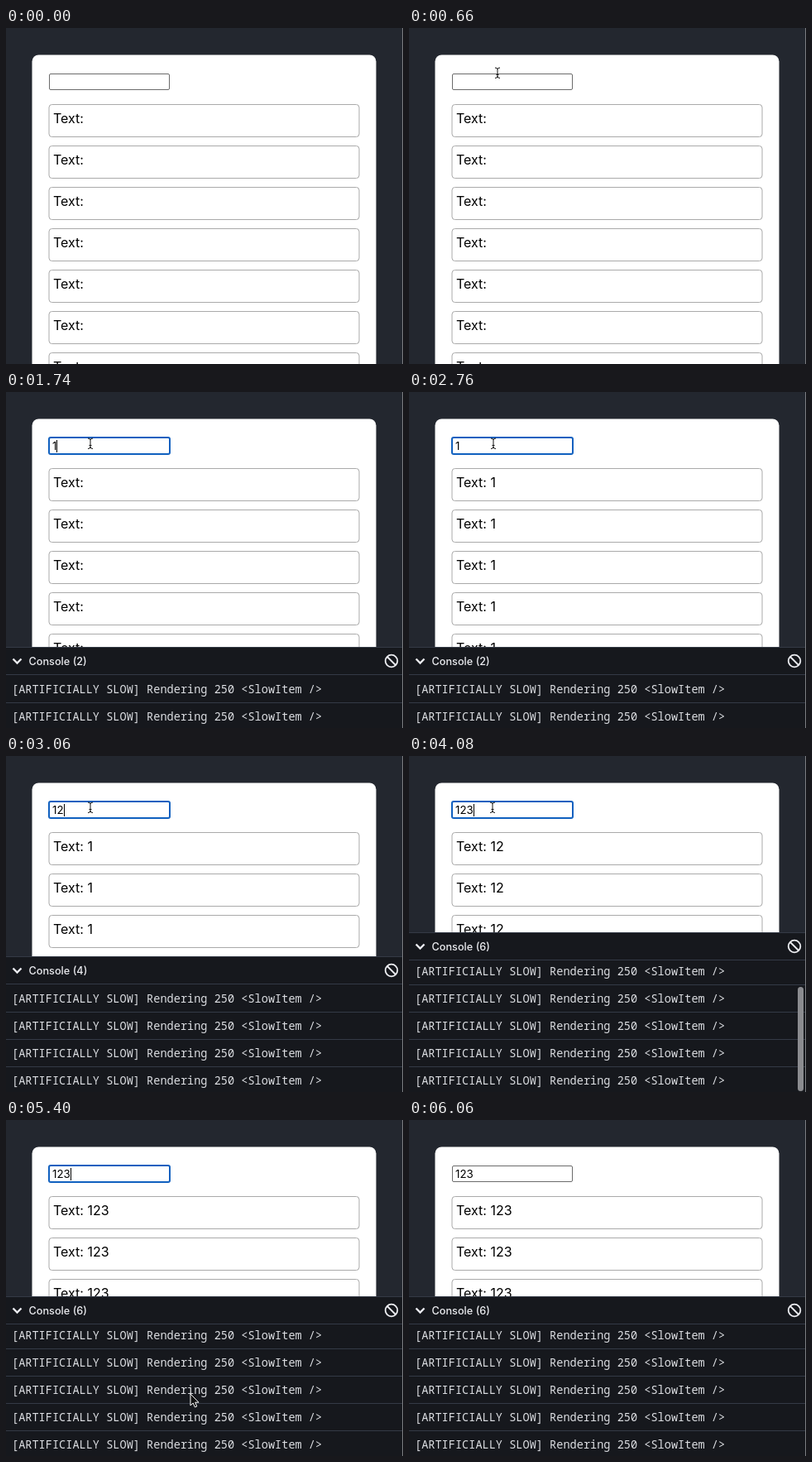
Write an HTML page that moves like this. It is 480x406 px and loops after 7080 ms.

```html
<!DOCTYPE html>
<html lang="en">
<head>
<meta charset="utf-8">
<style>
  * { box-sizing: border-box; }
  html, body { margin: 0; width: 100%; height: 100%; overflow: hidden; }
  body { position: relative; background: #23272f; }
  #stage, #stage div, svg { position: absolute; }
  #stage { width: 480px; height: 406px; overflow: hidden; }
  #card {
    left: 31px; top: 32px; width: 415.5px; height: 400px; border-radius: 8px;
    background: #fff; transform: translate(.5px, .5px);
  }
  #edge { right: 0; width: 1px; height: 100%; background: #7b7d81; }
  #field {
    left: 52px; top: 55px; width: 146px; height: 20px; padding-left: 3px;
    border: 1px solid #6b6b6b; border-radius: 2px; background: #fff;
    font: 13.33px/18px Inter, sans-serif; color: #000; white-space: pre;
  }
  #field.focus { box-shadow: 0 0 0 1px #1060bf; border-color: #1060bf; }
  #caret { position: absolute; top: 2px; width: 1px; height: 15px; background: #000; }
  #list { transform: translateX(-.5px); }
  .item {
    left: 52px; width: 376px; height: 40px; padding: 4px 4.5px;
    border: 1px solid #aaa; border-radius: 4px;
    font: 16px/24px Inter, sans-serif; color: #000; white-space: pre;
  }
  #console { left: 0; bottom: -2px; width: 479px; overflow: hidden; background: #16181d; color: #ebecf0; }
  #head {
    top: 0; width: 100%; height: 34px; padding-left: 27.5px; background: #16181d;
    border: solid #343a46; border-width: 1px 0;
    font: 500 12.7px/33px Inter, sans-serif;
  }
  #head svg { left: 0; top: -1px; }
  #rows { bottom: 0; width: 100%; }
  #rows p {
    margin: 0; height: 33px; padding-left: 7px;
    font: 13.6px/33px "Noto Sans Mono", monospace; white-space: pre; color: #dcdee2;
  }
  #rows p + p { border-top: 1px solid #343a46; line-height: 31px; }
  #thumb { left: 470px; top: 279px; width: 7px; height: 126px; border-radius: 4px; background: #8b8c90; }
  #pointer { left: 0; top: 0; overflow: visible; }
</style>
</head>
<body>
<div id="stage">
  <div id="card"></div>
  <div id="field"><span id="typed"></span><span id="caret"></span></div>
  <div id="list"></div>
  <div id="console">
    <div id="rows"></div>
    <div id="head"><span id="count"></span>
      <svg width="479" height="34" fill="none" stroke="#ebecf0">
        <path d="M8.5 14.5l5 5 5-5" stroke-width="2.4"/>
        <circle cx="466" cy="17" r="7.3" stroke-width="1.8"/>
        <path d="M461 12l10 10" stroke-width="1.8"/>
      </svg>
    </div>
  </div>
  <div id="thumb"></div>
  <div id="edge"></div>
  <svg id="pointer" width="1" height="1">
    <path id="beam" d="M-3-6Q0-6 0-4Q0-6 3-6M0-4V5M-3 6.5Q0 6.5 0 4.5Q0 6.5 3 6.5M-1.5 2.5H1.5" fill="none" stroke="#111"/>
    <path id="arrow" d="M0 0V14L3.2 11 5.4 16 7.8 15 5.7 10.2H10Z" fill="#111" stroke="#fff"/>
  </svg>
</div>
<script>
  const LOOP = 7080, TICK = 60;
  const $ = id => document.getElementById(id);

  const KEYS = [1740, 2940, 4020];        // a digit is typed
  const UPDATES = [2100, 3360, 4440];     // the list catches up
  const FOCUS = 1020, BLUR = 6060;
  const BLINKS = [FOCUS, 1740, 3000, 4080], BLINK = 535;
  const PATH = [[60, 260, 410], [660, 107, 54], [1020, 102, 62], [3720, 102, 62], [3960, 101, 62],
    [4140, 101, 62], [4260, 102, 62], [4920, 102, 62], [5640, 265, 425]];

  const passed = (times, t) => times.filter(at => t >= at).length;
  const show = (el, on) => { el.style.visibility = on ? "visible" : "hidden"; };

  for (let i = 0; i < 7; i++) {
    const item = document.createElement("div");
    item.className = "item";
    item.style.top = 92 + 50 * i + "px";
    $("list").append(item);
  }

  function pointerAt(t) {
    const i = PATH.findIndex(p => p[0] > t);
    if (i < 1) return null;
    const [t0, x0, y0] = PATH[i - 1], [t1, x1, y1] = PATH[i];
    const u = (t - t0) / (t1 - t0), e = u * u * (3 - 2 * u);
    return [x0 + (x1 - x0) * e, y0 + (y1 - y0) * e];
  }

  function drawPointer(t) {
    const p = pointerAt(t);
    const overField = p && p[0] > 50 && p[0] < 200 && p[1] > 52 && p[1] < 77;
    show($("beam"), overField);
    show($("arrow"), p && !overField);
    if (p) $("pointer").style.transform = `translate(${Math.round(p[0])}px,${Math.round(p[1])}px)`;
  }

  function drawField(t, typed) {
    const focused = t >= FOCUS && t < BLUR;
    const since = t - BLINKS[Math.max(0, passed(BLINKS, t) - 1)];
    $("field").className = focused ? "focus" : "";
    $("typed").textContent = "123".slice(0, typed);
    show($("caret"), focused && Math.floor(since / BLINK) % 2 === 0);
  }

  function drawConsole(t, logs) {
    show($("console"), logs > 0);
    $("console").style.height = Math.min(34 + 33 * logs, 195) + "px";
    $("count").textContent = `Console (${logs})`;
    $("rows").innerHTML = "<p>[ARTIFICIALLY SLOW] Rendering 250 &lt;SlowItem /&gt;</p>".repeat(logs);
    $("thumb").style.opacity = t < KEYS[2] ? 0 : Math.max(0, Math.min(1, (4700 - t) / 240));
  }

  let last = -1;
  function frame(now) {
    const t = Math.floor(now % LOOP / TICK) * TICK;
    if (t !== last) {
      last = t;
      const typed = passed(KEYS, t);
      const text = "Text: " + "123".slice(0, passed(UPDATES, t));
      for (const item of $("list").children) item.textContent = text;
      drawField(t, typed);
      drawConsole(t, typed * 2);
      drawPointer(t);
    }
    requestAnimationFrame(frame);
  }
  frame(0);
</script>
</body>
</html>
```
